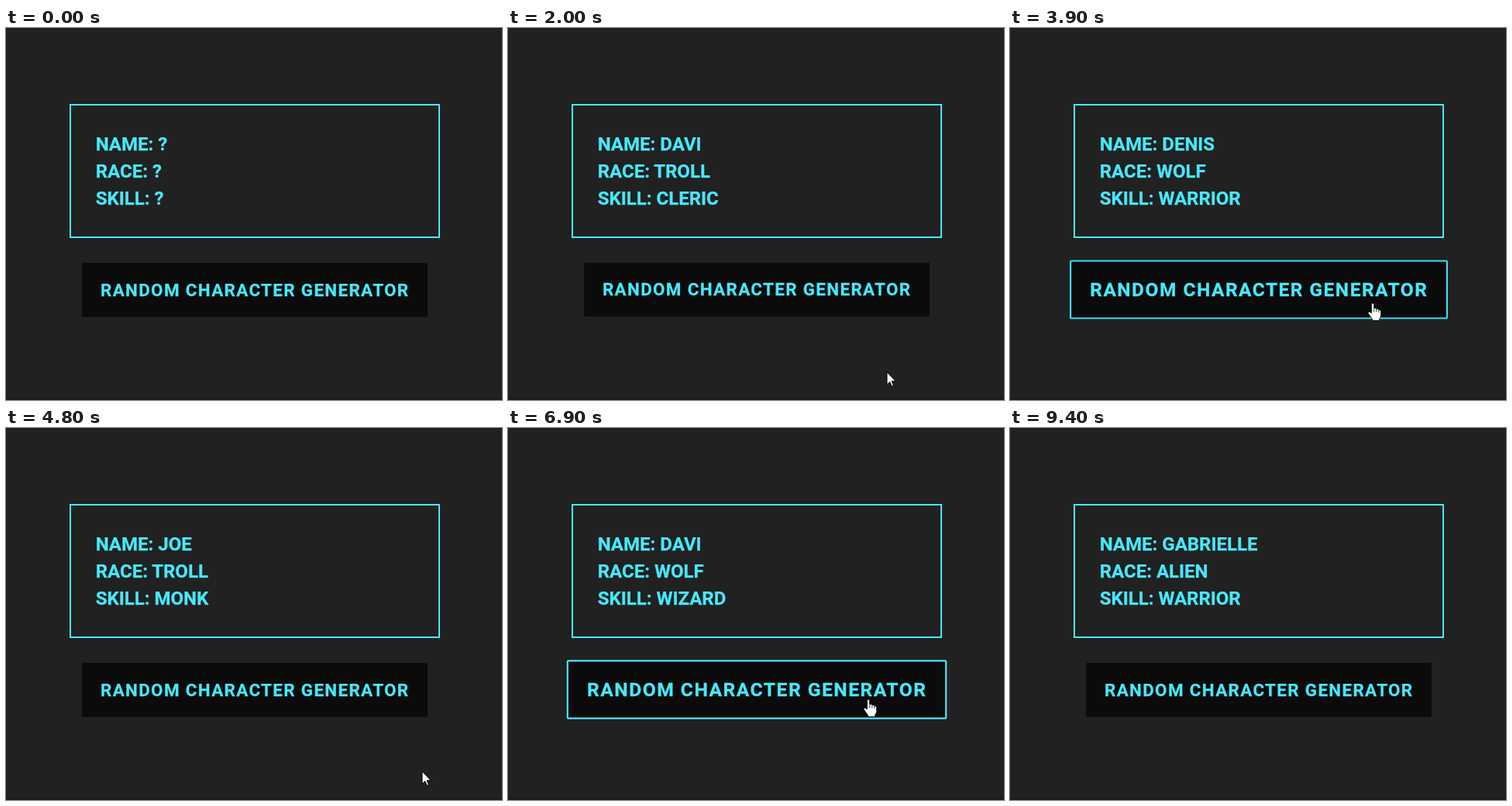
Recreate the animation shown at these times as an HTML page. Size 640x480 px, loop 9.8 s.

```html
<!DOCTYPE html>
<html lang="en">
<head>
<meta charset="utf-8">
<title>Random character generator</title>
<style>
  html, body { margin: 0; width: 100%; height: 100%; overflow: hidden; background: #212121; }
  svg { display: block; width: 640px; height: 480px; }
  text { font: 700 24px Roboto, sans-serif; fill: #47e9fd; stroke: #47e9fd; stroke-width: .25; white-space: pre; }
  #label { font-size: 22.4px; letter-spacing: .06em; }
  .line { fill: none; stroke: #47e9fd; stroke-width: 2; }
  .cursor { fill: #fff; stroke: #000; stroke-linejoin: round; }
</style>
</head>
<body>
<svg viewBox="0 0 640 480">
  <rect width="640" height="480" fill="#212121"/>
  <rect y="477" width="640" height="3" fill="#1e1a1c"/>
  <rect class="line" x="83" y="99" width="476" height="171"/>
  <text class="row" x="115.7" y="158"></text>
  <text class="row" x="115.7" y="193"></text>
  <text class="row" x="115.7" y="228"></text>
  <g id="button">
    <rect id="face" x="98" width="446" rx="2" fill="#0b0b0b"/>
    <rect id="edge" class="line" x="99" y="303.7" width="444" height="67.6" rx="1"/>
    <text id="label" x="122">RANDOM CHARACTER GENERATOR</text>
  </g>
  <g id="pointer">
    <path id="arrow" class="cursor" d="M0 0V16.2L3.7 12.7 6.2 18.3 8.5 17.3 6.1 11.8H11.2Z"/>
    <g id="hand">
      <path class="cursor" stroke-width=".8" d="M-1.6 1.5Q-1.6 0 0 0T1.6 1.5V6.5Q4.4 5.8 4.7 7.6 7.4 6.9 7.8 8.7 10.6 8.3 10.6 10.4V15.5Q10.5 18.5 8.6 20.2V22.5H-.5V20.4Q-2.5 18.5-5.6 13.6-6.6 11.6-5 11-3.4 10.8-1.6 13Z"/>
      <path d="M1.7 7V11.5M4.8 8V11.5M7.8 9V12" fill="none" stroke="#000" stroke-width=".8"/>
    </g>
  </g>
</svg>
<script>
const LOOP = 9800, STEP = 100, FADE = 300;
const LEAD = 540, LINGER = 260;   // hover time before and after a click
const HOME = [465, 350];          // where the pointer clicks
const $ = id => document.getElementById(id);
const rows = [...document.querySelectorAll('.row')];
const titles = ['NAME', 'RACE', 'SKILL'];

// each click: its time, the character it rolls, how far the pointer then swings out
const clicks = [
  { at: 1460, roll: ['DAVI', 'TROLL', 'CLERIC'], swing: [25, 96] },
  { at: 2650, roll: ['DENIS', 'WOLF', 'WARRIOR'], swing: [75, 98] },
  { at: 4230, roll: ['JOE', 'TROLL', 'MONK'], swing: [72, 93] },
  { at: 5600, roll: ['JOE', 'ALIEN', 'CLERIC'], swing: [46, 85] },
  { at: 6900, roll: ['DAVI', 'WOLF', 'WIZARD'], swing: [5, 74] },
  { at: 8200, roll: ['GABRIELLE', 'ALIEN', 'WARRIOR'] }
];
const first = clicks[0].at, last = clicks[clicks.length - 1].at;

// time, x, y
const entry = [[400, 1, 35], [950, 150, 304], [1200, 180, 313], [first, ...HOME]];
const exit = [[last, ...HOME], [8400, 190, 461], [8500, 5, 300], [8700, 2, 69],
              [8800, 2, 69], [9000, 29, 50], [9400, 0, -20]];

// CSS "ease": cubic-bezier(.25, .1, .25, 1)
function ease(x) {
  if (x <= 0) return 0;
  if (x >= 1) return 1;
  let lo = 0, hi = 1, s;
  for (let i = 0; i < 20; i++) {
    s = (lo + hi) / 2;
    if (.75 * s * (1 - s) + s ** 3 < x) lo = s; else hi = s;
  }
  return .3 * s * (1 - s) ** 2 + 3 * s * s * (1 - s) + s ** 3;
}

function along(path, t) {
  const i = path.findIndex(k => k[0] > t);
  const [a, ...p] = path[i - 1], [b, ...q] = path[i];
  return p.map((v, j) => v + (q[j] - v) * (t - a) / (b - a));
}

function pointAt(t) {
  if (t < first) return along(entry, t);
  if (t >= last) return along(exit, t);
  const i = clicks.findIndex(c => c.at > t);
  const { at, swing } = clicks[i - 1];
  const u = Math.min(1, (t - at) / (clicks[i].at - 200 - at));
  const out = Math.max(0, Math.sin(Math.PI * u)) ** 2.5;
  return HOME.map((v, j) => v + swing[j] * out);
}

function drawButton(t) {
  const p = clicks.reduce((sum, { at }) =>
    sum + ease((t - at + LEAD) / FADE) - ease((t - at - LINGER) / FADE), 0);
  const still = p < 1e-6;
  // at rest the button sits on whole pixels
  $('face').setAttribute('y', still ? 303 : 302.7);
  $('face').setAttribute('height', still ? 70 : 69.6);
  $('label').setAttribute('y', still ? 346 : 345.3);
  $('edge').style.opacity = still ? 0 : p;
  $('button').setAttribute('transform', still ? '' :
    `translate(321 337.5) scale(${1 + p / 10}) translate(-321 -337.5)`);
}

function drawPointer(t) {
  const shown = t >= 400 && t < 9400;
  $('pointer').style.display = shown ? '' : 'none';
  if (!shown) return;
  const [x, y] = pointAt(t).map(Math.round);
  const over = x > 76 && y > 300 && y < 376;
  $('pointer').setAttribute('transform', `translate(${x} ${y})`);
  $('arrow').style.display = over ? 'none' : '';
  $('hand').style.display = over ? '' : 'none';
}

function draw(now) {
  const t = Math.floor(now % LOOP / STEP) * STEP;
  const done = clicks.filter(c => c.at <= t).pop();
  rows.forEach((row, i) => row.textContent = `${titles[i]}: ${done ? done.roll[i] : '?'}`);
  drawButton(t);
  drawPointer(t);
}

let start;
function tick(now) {
  start ??= now;
  draw(now - start);
  requestAnimationFrame(tick);
}
draw(0);
requestAnimationFrame(tick);
</script>
</body>
</html>
```
